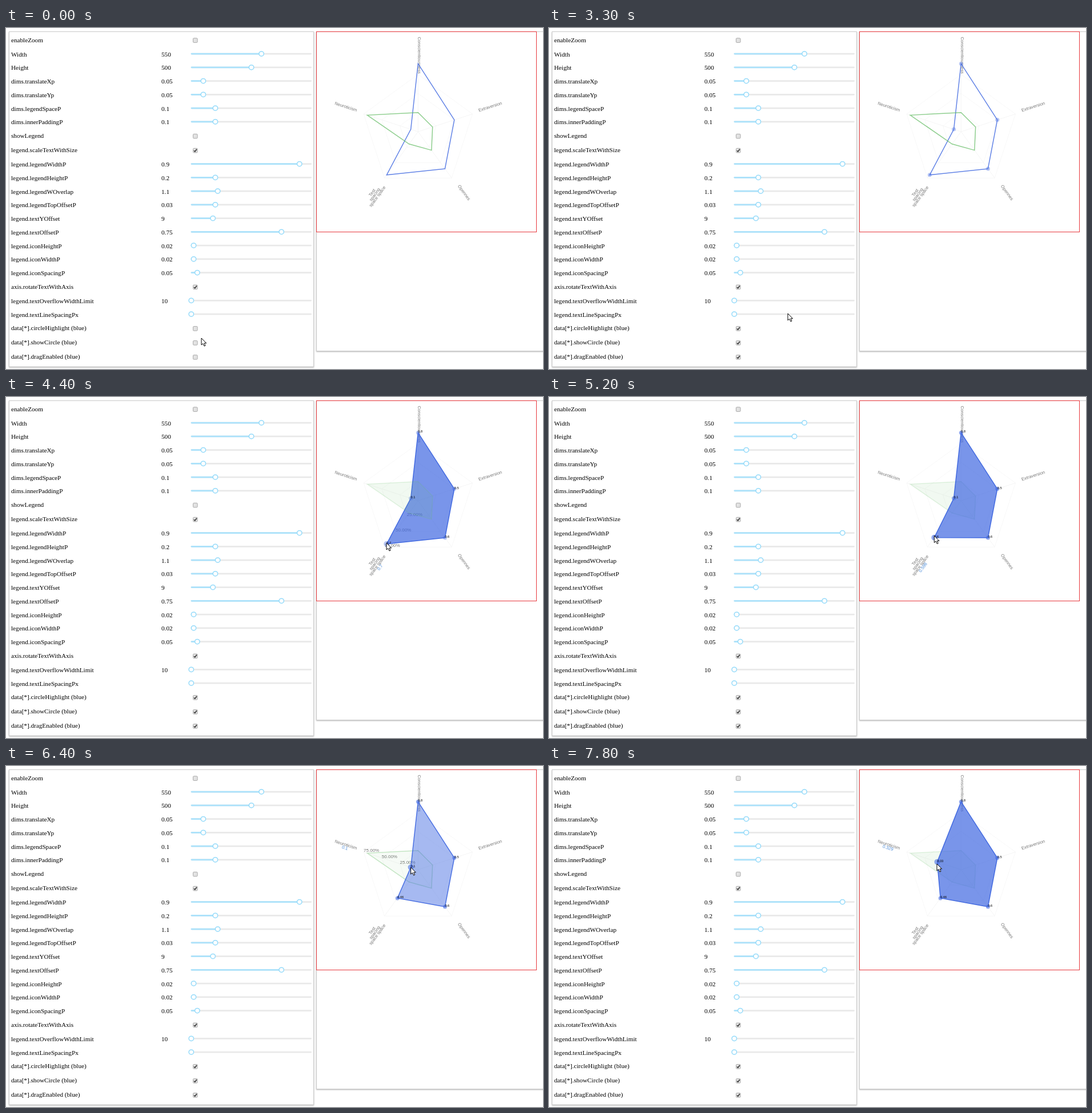
Animation of 940 by 596 pixels, one loop 8 s. Source, as an HTML page:

```html
<!DOCTYPE html>
<html lang="en">
<head>
<meta charset="utf-8">
<title>Radar chart settings</title>
<style>
  html, body { margin: 0; width: 100%; height: 100%; overflow: hidden; background: #fff; }
  svg { display: block; }
  .panel { fill: #fff; stroke: #ccc; filter: drop-shadow(0 1px 1px rgba(0,0,0,.3)); }
  .form { font: 11.2px "Liberation Serif", "Times New Roman", serif; fill: #000; }
  .axis, .readout { font: 7.7px "Liberation Sans", Arial, sans-serif; fill: #777; text-anchor: middle; }
  .readout { fill: #4a8ad8; }
  .tick { font: 8px "Liberation Sans", Arial, sans-serif; fill: #777; }
  .point { font: 5.6px "Liberation Sans", Arial, sans-serif; fill: #000; }
</style>
</head>
<body>
<script>
const LOOP = 8000;
const BLUE = '#4169e1', GREEN = '#69be69';
const CENTER = { x: 721.3, y: 181.2 }, RADIUS = 133.5;
const TEST = 3, NEUROTICISM = 4;

function set(node, attrs) {
  for (const key in attrs) node.setAttribute(key, attrs[key]);
}
function el(parent, tag, attrs = {}, text) {
  const node = document.createElementNS('http://www.w3.org/2000/svg', tag);
  set(node, attrs);
  if (text !== undefined) node.textContent = text;
  parent.appendChild(node);
  return node;
}
const show = (node, on) => node.setAttribute('visibility', on ? 'visible' : 'hidden');

const svg = el(document.body, 'svg', { width: 940, height: 596, viewBox: '0 0 940 596' });
el(svg, 'rect', { class: 'panel', x: 5.5, y: 6.5, width: 533, height: 585.5 });
el(svg, 'rect', { class: 'panel', x: 543.5, y: 6.5, width: 420, height: 558 });

// Form
const TRACK = { left: 324.3, width: 210.5 };
let rowY = 21;

function rowText(x, text) {
  el(svg, 'text', { class: 'form', x, y: Math.round(rowY + 3.6) }, text);
}
function slider(name, value, max = 1, min = 0) {
  rowText(9, name);
  if (value) rowText(272, value);
  const y = rowY - .9, x = TRACK.left + TRACK.width * (value - min) / (max - min);
  const line = { y1: y, y2: y, x1: TRACK.left + .7, 'stroke-width': 2.8, 'stroke-linecap': 'round' };
  el(svg, 'line', { ...line, x2: TRACK.left + TRACK.width - 1.3, stroke: '#e9e9e9' });
  if (value > min) el(svg, 'line', { ...line, x2: x, stroke: '#abe2fb' });
  el(svg, 'circle', { cx: x, cy: y, r: 4.2, fill: '#fff', stroke: '#96dbfa', 'stroke-width': 1.5 });
  rowY += 23.75;
}
function checkBox(name, checked) {
  rowText(9, name);
  const x = 327.5, y = rowY + .4;
  el(svg, 'rect', { x, y: y - 3.6, width: 7.6, height: 7.6, rx: 1.3,
    fill: '#e2e2e2', stroke: '#a3a3a3', 'stroke-width': .9 });
  const mark = el(svg, 'path', { d: `M${x + 1.5} ${y + .3}l1.7 1.9 3.2 -4.4`,
    fill: 'none', stroke: '#333', 'stroke-width': 1.6 });
  show(mark, checked);
  rowY += 25;
  return { mark, spot: { x: x + 2.5, y: y - .5 } };
}

checkBox('enableZoom');
slider('Width', 550, 800, 200);
slider('Height', 500, 800, 200);
for (const name of ['translateXp', 'translateYp']) slider('dims.' + name, .05, .5);
for (const name of ['legendSpaceP', 'innerPaddingP']) slider('dims.' + name, .1, .5);
checkBox('showLegend');
checkBox('legend.scaleTextWithSize', true);
slider('legend.legendWidthP', .9);
slider('legend.legendHeightP', .2);
slider('legend.legendWOverlap', 1.1, 5);
slider('legend.legendTopOffsetP', .03, .15);
slider('legend.textYOffset', 9, 50);
slider('legend.textOffsetP', .75);
slider('legend.iconHeightP', .02);
slider('legend.iconWidthP', .02);
slider('legend.iconSpacingP', .05);
checkBox('axis.rotateTextWithAxis', true);
slider('legend.textOverflowWidthLimit', 10, 100, 10);
slider('legend.textLineSpacingPx', 0);
const highlightBox = checkBox('data[*].circleHighlight (blue)');
const circleBox = checkBox('data[*].showCircle (blue)');
const dragBox = checkBox('data[*].dragEnabled (blue)');

// Chart
function polar(axis, value) {
  const a = axis * Math.PI * 2 / 5;
  return { x: CENTER.x + Math.sin(a) * value * RADIUS, y: CENTER.y - Math.cos(a) * value * RADIUS };
}
const outline = values => values.map((v, i) => {
  const p = polar(i, v);
  return `${p.x.toFixed(2)},${p.y.toFixed(2)}`;
}).join(' ');

el(svg, 'rect', { x: 543.5, y: 6.5, width: 385, height: 350, fill: 'none', stroke: '#e8383d' });
for (const level of [.25, .5, .75])
  el(svg, 'polygon', { points: outline(Array(5).fill(level)), fill: 'none', stroke: '#f6f6f6', 'stroke-width': .8 });
for (let i = 0; i < 5; i++) {
  const end = polar(i, .75);
  el(svg, 'line', { x1: CENTER.x, y1: CENTER.y, x2: end.x, y2: end.y, stroke: '#f3f3f3', 'stroke-width': .8 });
}

// Text runs along its axis and is flipped where it would stand upside down.
function axisText(axis, line, text, className = 'axis') {
  const { x, y } = polar(axis, 1);
  const angle = 72 * axis - 90;
  const upright = axis === 0 || axis > 2 ? angle + 180 : angle;
  return el(svg, 'text', { class: className, y: line * 5.7,
    transform: `translate(${x} ${y}) rotate(${upright})` }, text);
}
const axisNames = ['Conscientiousness', 'Extraversion', 'Opennes', 'Test|spacing|space space', 'Neuroticism'];
const readouts = axisNames.map((name, axis) => {
  const lines = name.split('|');
  lines.forEach((text, line) => axisText(axis, line, text));
  return axisText(axis, lines.length, '', 'readout');
});

const ticks = [.25, .5, .75].map(level => ({
  level, node: el(svg, 'text', { class: 'tick' }, (level * 100).toFixed(2) + '%')
}));
const layers = el(svg, 'g');
const green = el(layers, 'polygon', { points: outline([.25, .2, .3, .2, .7]), fill: GREEN, stroke: GREEN, 'stroke-width': 1.5 });
const blue = el(layers, 'g');
const area = el(blue, 'polygon', { fill: BLUE, stroke: BLUE, 'stroke-width': 1.5 });
const dots = axisNames.map(() => el(blue, 'circle', { fill: BLUE }));
const labels = axisNames.map(() => el(svg, 'text', { class: 'point' }));
const cursor = el(svg, 'path', { d: 'M0 0V12L2.8 9.5 5 14 7 13.1 5 8.9H8.7Z',
  fill: '#fff', stroke: '#000', 'stroke-linejoin': 'round' });

// Motion
const ramp = (t, from, to) => Math.min(1, Math.max(0, (t - from) / (to - from)));
const within = (t, from, to) => t >= from && t < to;

const moves = [
  { from: 0, to: 700, end: dragBox.spot },
  { from: 1100, to: 1800, end: circleBox.spot },
  { from: 2000, to: 2300, end: highlightBox.spot },
  { from: 3200, to: 3300, end: { x: 418, y: 499 } },
  { from: 3300, to: 3700, end: { x: 719, y: 186 } },
  { from: 3700, to: 4000, end: { x: 666, y: 255 } },
  { from: 4600, to: 5900, end: { x: 684, y: 228 } },
  { from: 6000, to: 6400, end: polar(NEUROTICISM, .1) },
  { from: 6500, to: 6900, end: { x: 655, y: 155 } },
  { from: 6900, to: 7800, end: { x: 679, y: 171 } }
];
function cursorAt(t) {
  return moves.reduce((p, { from, to, end }) => {
    const k = ramp(t, from, to);
    return { x: p.x + (end.x - p.x) * k, y: p.y + (end.y - p.y) * k };
  }, { x: 342, y: 542 });
}

function render(time) {
  const t = Math.floor(time / 100) * 100;
  const pointer = cursorAt(t);
  const left = ramp(t, 5900, 6200), back = ramp(t, 6200, 6500);
  const hover = ramp(t, 3700, 4200) - left + back;
  const fade = ramp(t, 4000, 4300) - left + back;
  const test = .7 - .24 * ramp(t, 4600, 6012);
  const neuroticism = .1 + .354 * ramp(t, 6500, 6900) - .125 * ramp(t, 6900, 7800);
  const values = [.89, .5, .6, test, neuroticism];
  const dragged = t >= 4600;

  set(cursor, { transform: `translate(${pointer.x} ${pointer.y})` });
  show(dragBox.mark, t >= 900);
  show(circleBox.mark, t >= 2000);
  show(highlightBox.mark, t >= 2300);

  const top = dragged ? blue : green;
  if (layers.lastChild !== top) layers.appendChild(top);
  set(green, { 'fill-opacity': .09 * fade, 'stroke-opacity': .75 - .55 * fade });
  set(area, { points: outline(values), 'fill-opacity': .7 * hover, 'stroke-opacity': .82 + .15 * hover });

  values.forEach((v, i) => {
    const { x, y } = polar(i, v);
    const near = hover > 0 && Math.hypot(pointer.x - x, pointer.y - y) < 6;
    set(dots[i], { cx: x, cy: y, r: near ? 5 : 3.5, 'fill-opacity': dragged ? .58 : .38 });
    show(dots[i], t >= 2000);
    set(labels[i], { x, y, opacity: Math.min(1, hover * 2) });
    labels[i].textContent = i ? +v.toFixed(2) : '0.8';
  });

  const active = within(t, 3900, 6100) ? TEST : t >= 6400 ? NEUROTICISM : -1;
  readouts.forEach((node, i) => { node.textContent = i === active ? +values[i].toFixed(3) : ''; });
  const ticksOn = within(t, 4000, 4600) || within(t, 6400, 7100);
  for (const { level, node } of ticks) {
    set(node, polar(Math.max(active, 0), level));
    show(node, ticksOn);
  }
}

const start = performance.now();
function frame() {
  render((performance.now() - start) % LOOP);
  requestAnimationFrame(frame);
}
render(0);
requestAnimationFrame(frame);
</script>
</body>
</html>
```
